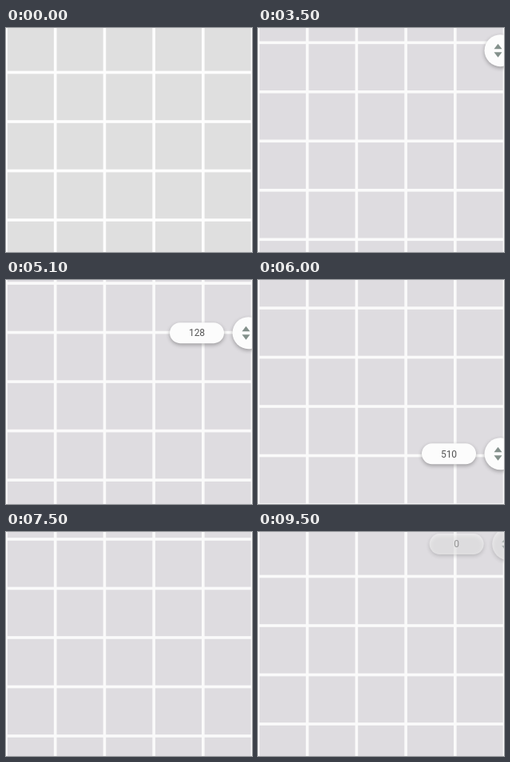
An HTML page with a canvas for the animation above (9600 ms loop, 308 px wide and 280 px high).

```html
<!DOCTYPE html>
<html lang="en">
<head>
<meta charset="utf-8">
<title>Grid with fast scroller</title>
<style>
  html, body { margin: 0; width: 100%; height: 100%; overflow: hidden; }
  canvas { display: block; }
</style>
</head>
<body>
<canvas id="stage" width="308" height="280"></canvas>
<script>
const ctx = document.getElementById('stage').getContext('2d');
const LOOP = 9600, ROW = 61.5, COLUMN = 61.7, FIRST_LINE = 55.5;
const SCROLL_PER_PX = 31.12, SCROLL_PER_ITEM = 12.32, HANDLE_TOP = 15.08;

const outCubic = p => 1 - (1 - p) ** 3;
const inCubic = p => p ** 3;
const inOutCubic = p => p < .5 ? 4 * p ** 3 : 1 - 4 * (1 - p) ** 3;
const clamp01 = v => Math.min(1, Math.max(0, v));
const progress = (t, start, end) => clamp01((t - start) / (end - start));

// Scroll position: a flick, then the handle is dragged down and back to the top.
const moves = [
  { start: 2550, end: 3949, to: 420, ease: outCubic },
  { start: 4370, end: 6375, to: 6450, ease: inOutCubic },
  { start: 6375, end: 6800, to: 6439, ease: outCubic },
  { start: 6960, end: 7520, to: 12655, ease: inOutCubic },
  { start: 7650, end: 8600, to: 4, ease: inCubic },
  { start: 8600, end: 8700, to: 0, ease: outCubic }
];

function scrollAt(t) {
  let scroll = 0;
  for (const { start, end, to, ease } of moves) {
    if (t < start) break;
    scroll += (to - scroll) * ease(progress(t, start, end));
  }
  return scroll;
}

function drawGrid(scroll, moved) {
  ctx.fillStyle = moved ? '#dedce0' : '#dfdfdf';
  ctx.fillRect(0, 0, 308, 280);
  ctx.fillStyle = moved ? '#fafafa' : '#fdfdfd';
  const phase = (((FIRST_LINE - scroll) % ROW) + ROW) % ROW;
  for (let y = phase - ROW; y < 284; y += ROW) ctx.fillRect(0, y - 1.8, 308, 3.6);
  for (let i = 0; i < 6; i++) ctx.fillRect(i * COLUMN - 1.8, 0, 3.6, 280);
}

function whiteShape(x, y, width, height) {
  ctx.save();
  ctx.shadowColor = 'rgba(0,0,0,.3)';
  ctx.shadowBlur = 5;
  ctx.shadowOffsetY = 2;
  ctx.fillStyle = '#fcfcfc';
  ctx.beginPath();
  ctx.roundRect(x - width / 2, y - height / 2, width, height, height / 2);
  ctx.fill();
  ctx.restore();
}

function arrow(x, y, direction) {
  ctx.beginPath();
  ctx.moveTo(x - 5, y + 2 * direction);
  ctx.lineTo(x + 5, y + 2 * direction);
  ctx.lineTo(x, y + 8.5 * direction);
  ctx.fill();
}

function drawScroller(t, scroll) {
  const leaving = progress(t, 9350, 9600);
  const hidden = Math.max(1 - progress(t, 2550, 2750), leaving);
  if (hidden === 1) return;
  const y = HANDLE_TOP + scroll / SCROLL_PER_PX;
  ctx.save();
  ctx.translate(hidden * 16, 0);
  ctx.globalAlpha = 1 - hidden * .75;
  whiteShape(303.5, y, 40, 40);
  ctx.fillStyle = '#83908b';
  arrow(300.5, y, -1);
  arrow(300.5, y, 1);

  const bubble = progress(t, 4350, 4500);
  if (bubble) {
    ctx.globalAlpha *= bubble;
    whiteShape(239, y, 68, 26);
    ctx.fillStyle = '#555';
    ctx.font = '12px Roboto, sans-serif';
    ctx.textAlign = 'center';
    ctx.fillText(Math.floor(scroll / SCROLL_PER_ITEM), 239, y + 4.3);
  }
  ctx.restore();
}

function frame() {
  const t = performance.now() % LOOP;
  const scroll = scrollAt(t);
  drawGrid(scroll, t >= 2550);
  drawScroller(t, scroll);
  requestAnimationFrame(frame);
}
frame();
</script>
</body>
</html>
```
